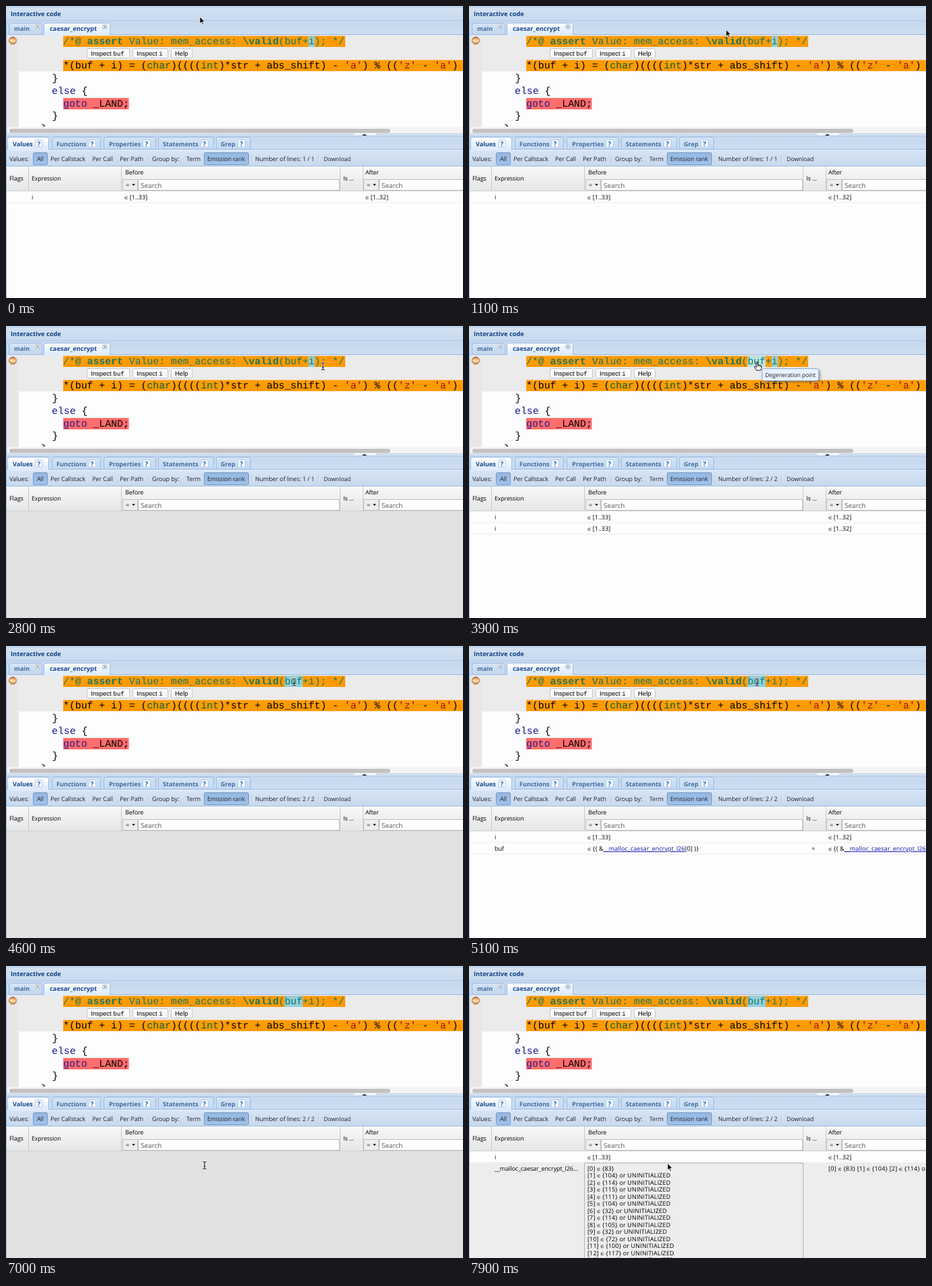
Recreate the animation shown at these times as an HTML page. Size 679 px wide and 435 px high, loop 8 s.

```html
<!DOCTYPE html>
<html lang="en">
<head>
<meta charset="utf-8">
<title>Interactive code</title>
<style>
html, body { margin: 0; width: 100%; height: 100%; overflow: hidden; background: #fdfdfd; }
svg { display: block; }
text { white-space: pre; font-family: "Open Sans", "Noto Sans", sans-serif; text-rendering: geometricPrecision; }
.code { font-family: "Liberation Mono", "Courier New", monospace; font-size: 14.82px; }
.btn { font-family: "Liberation Sans", Arial, sans-serif; font-size: 9.5px; }
.mono { font-family: "Liberation Mono", monospace; font-size: 9.2px; }
.in { font-family: "DejaVu Sans", sans-serif; font-size: 6px; }
.link { fill: #1010b0; text-decoration: underline; }
</style>
</head>
<body>
<svg id="stage" width="679" height="435" viewBox="0 0 679 435"></svg>
<script>
const LOOP = 8000;
const CW = 8.894; // code character width
const HEAP = '__malloc_caesar_encrypt_l26';

const esc = s => s.replace(/&/g, '&amp;').replace(/</g, '&lt;');
const rect = (x, y, w, h, fill, more = '') =>
  `<rect x="${x}" y="${y}" width="${w}" height="${h}" fill="${fill}" ${more}/>`;
const box = (x, y, w, h, fill, stroke, r = 0) =>
  rect(x + .5, y + .5, w - 1, h - 1, fill, `stroke="${stroke}" rx="${r}"`);
const grad = (id, ...stops) => `<linearGradient id="${id}" x2="0" y2="1">` +
  stops.map((c, i) => `<stop offset="${i / (stops.length - 1)}" stop-color="${c}"/>`).join('') +
  '</linearGradient>';
const raw = (x, y, html, { size = 9, fill = '#000', ls = -.1, more = '' } = {}) =>
  `<text x="${x}" y="${y}" font-size="${size}" fill="${fill}" letter-spacing="${ls}" ${more}>${html}</text>`;
const text = (x, y, s, opt) => raw(x, y, esc(s), opt);
const bold = (x, y, s, fill, size = 9.1) =>
  text(x, y, s, { size, fill, ls: 0, more: 'font-weight="700"' });
const inSet = s => `<tspan class="in">∈</tspan> ${s}`;
const group = (id, body) => `<g id="${id}">${body}</g>`;

// Each run is [text, colour, bold?]
const code = (x, y, ...runs) => `<text class="code" x="${x}" y="${y}">` + runs.map(([s, c = '#000', b]) =>
  `<tspan fill="${c}"${b ? ' font-weight="700"' : ''}>${esc(s)}</tspan>`).join('') + '</text>';

function defs() {
  return '<defs>' +
    grad('head', '#d2e1f3', '#c8daef', '#bfd3eb') +
    grad('strip', '#c6d8ee', '#cfdff2') +
    grad('tab', '#d6e4f5', '#c3d7ef') +
    grad('tabOn', '#ffffff', '#deebfb') +
    grad('tools', '#d6e3f3', '#c7d9ee') +
    grad('pressed', '#94b7e3', '#a2c2e9') +
    grad('cols', '#f9f9f9', '#e5e6e8') +
    grad('ball', '#d9702a', '#ffe6b4', '#e88a2a') +
    '<clipPath id="view"><rect x="1" y="44" width="678" height="136.5"/></clipPath>' +
    '<filter id="shade" x="-10%" y="-20%" width="125%" height="160%">' +
    '<feDropShadow dx="2" dy="2" stdDeviation="1.5" flood-color="#555" flood-opacity=".55"/></filter></defs>';
}

function tab(x, w, y, h, on) {
  return `<path d="M${x + .5} ${y + h}v${4 - h}q0 -3.5 3.5 -3.5h${w - 8}q3.5 0 3.5 3.5v${h - 4}"
    fill="url(#${on ? 'tabOn' : 'tab'})" stroke="#99bae4"/>`;
}

function closeIcon(x, y) {
  return `<rect x="${x - 3.5}" y="${y - 3.5}" width="7" height="7" rx="2" fill="#e6eaf0" stroke="#a9b8cb" stroke-width=".8"/>
    <path d="M${x - 1.6} ${y - 1.6}l3.2 3.2m0 -3.2l-3.2 3.2" stroke="#71839a"/>`;
}

function codePanel() {
  const doc = '#1a755f', type = '#08603a', str = '#96150c', key = '#16168c';
  const button = (x, w, label, arg = '') => box(x, 63, w, 15, '#fafafa', '#c6c6c6', 1) +
    `<text class="btn" x="${x + 6}" y="74" fill="#000">${label}<tspan class="mono">${arg}</tspan></text>`;
  const mark = (id, from, len, fill) => rect(85 + from * CW, 44.5, len * CW, 16.5, fill, `id="${id}"`);
  return rect(0, 0, 679, 44, 'url(#head)') + rect(0, 1, 679, 1, '#a9c4e6') +
    rect(0, 22, 679, 22, 'url(#strip)') + rect(0, 21, 679, 1, '#b3cae6') +
    bold(7, 15, 'Interactive code', '#0f3f80', 9.25) +
    tab(4, 50, 25, 17, false) + tab(56, 99, 25, 17, true) +
    rect(0, 42, 679, 1, '#99bae4') + rect(57, 42, 97, 1, '#deebfb') + rect(0, 43, 679, 1, '#deebfb') +
    bold(12, 37, 'main', '#416da3') + bold(65, 37, 'caesar_encrypt', '#15498b', 9.3) +
    closeIcon(47, 31) + closeIcon(147, 31) +
    rect(0, 44, 679, 146, '#fdfdfd') + rect(1, 44, 18, 137, '#e8e6e6') + rect(19, 44, 660, 53.5, '#ebebeb') +
    '<g clip-path="url(#view)">' +
    rect(85, 44.5, 419, 16.5, '#ff9b00') + rect(85, 80.5, 594, 16.5, '#ff9b00') + rect(85, 137, 97.5, 17, '#ff6d6d') +
    mark('selBuf', 37, 3, '#8fd0de') + mark('hotBuf', 37, 3, '#b8e4e6') + mark('selI', 41, 1, '#8fd0de') +
    code(85, 57, ['/*@ ', doc], ['assert', doc, 1], [' Value: mem_access: ', doc], ['\\valid', doc, 1], ['(buf+i); */', doc]) +
    code(85, 93, ['*(buf + i) = ('], ['char', type], [')(((('], ['int', type], [')*str + abs_shift) - '],
      ["'a'", str], [') % (('], ["'z'", str], [' - '], ["'a'", str], [') ']) +
    code(68.5, 112, ['}']) + code(68, 131, ['else', key], [' {']) +
    code(85, 150, ['goto', '#2a1690'], [' _LAND;']) + code(68.5, 168, ['}']) + code(52, 187, ['}']) + '</g>' +
    button(120, 64, 'Inspect ', 'buf') + button(188, 53, 'Inspect ', 'i') + button(245, 32, 'Help') +
    '<circle cx="10" cy="51.5" r="5.3" fill="url(#ball)" stroke="#9a5436"/>' +
    rect(1, 180, 678, 10, '#f3f3f3') + rect(5, 183, 566, 6, '#c1c1c1', 'rx="3"') +
    rect(0, 22, 1, 168, '#99bce8') + rect(1, 44, 1, 146, '#d5e2f2');
}

function tabsAndTools() {
  const tabs = [['Values', 2, 62, 10, 43], ['Functions', 68, 73, 75, 122], ['Properties', 145, 78, 153, 203],
    ['Statements', 226, 83, 233, 289], ['Grep', 312, 52, 319, 344]];
  const labels = [['Values:', 5], ['All', 46], ['Per Callstack', 66], ['Per Call', 128], ['Per Path', 169],
    ['Group by:', 217], ['Term', 268], ['Emission rank', 299, 8.8], ['Download', 472, 8.7]];
  return rect(0, 190, 679, 1, '#a9c4e6') + rect(0, 191, 679, 3, '#dfe9f6') +
    rect(517, 190, 33, 3, '#f0f5fb') + '<path d="M529 193h7l-3.5 -2.4z" fill="#222"/>' +
    rect(0, 193, 679, 22, 'url(#strip)') + rect(0, 193, 679, 1, '#a9c4e6') +
    tabs.map(([s, x, w, tx, qx], i) => tab(x, w, 195, 18, !i) +
      bold(tx, 208.5, s, i ? '#416da3' : '#15498b') +
      box(qx, 199, 12, 12, '#f2f7fd', '#b4cdea', 2) +
      bold(qx + 3.6, 208.7, '?', '#2f6cb5', 10)).join('') +
    rect(0, 213, 679, 1, '#99bae4') + rect(3, 213, 60, 1, '#deebfb') + rect(0, 214, 679, 2, '#deebfb') +
    rect(0, 216, 679, 23, 'url(#tools)') + rect(0, 238, 679, 1, '#99bce8') +
    box(40, 218, 22, 19, 'url(#pressed)', '#7698c6', 2) + box(294, 218, 67, 19, 'url(#pressed)', '#7698c6', 2) +
    [211, 365, 464].map(x => rect(x, 222, 1, 12, '#b4c6de') + rect(x + 1, 222, 1, 12, '#e4edf8')).join('') +
    labels.map(([s, x, size = 9]) => text(x, 231, s, { size, fill: '#222' })).join('') +
    text(370, 231, '', { fill: '#222', more: 'id="count"' });
}

function tableHead() {
  const filter = (x, w) => box(x, 258, 23, 17, '#eeeeee', '#c4c4c4') +
    text(x + 5, 270, '=', { fill: '#222' }) + `<path d="M${x + 14} 265h5l-2.5 3z" fill="#222"/>` +
    box(x + 23, 258, w, 17, '#ffffff', '#b9bcc8') + text(x + 27, 270.5, 'Search', { size: 10, fill: '#555', ls: 0 });
  return rect(0, 239, 679, 36, 'url(#cols)') +
    [33, 171, 496, 530].map(x => rect(x, 239, 1, 36, '#c8c8c8')).join('') +
    text(5, 260, 'Flags') + text(38, 260, 'Expression', { size: 8.8 }) + text(177, 251, 'Before') +
    text(501, 260, 'Is ...') + text(534, 251, 'After') +
    filter(173, 300) + filter(531, 140) + rect(0, 275, 679, 1, '#d0d0d0');
}

function row(y, name, before, after, same = '') {
  const o = { ls: .06 };
  return rect(1, y + 17, 678, 1, '#ededed') + text(38, y + 12.5, name) +
    raw(176, y + 12.5, inSet(before), o) + raw(534, y + 12.5, inSet(after), o) + text(509, y + 12.5, same);
}

function heapRow() {
  const cells = [83, 104, 114, 115, 111, 104, 32, 114, 105, 32, 72, 100, 117, 116];
  const cell = (v, i) => `[${i}] ${inSet(`{${v}}`)}`;
  return rect(1, 293, 678, 142, '#ededed') +
    `<path d="M171.5 440V293.5H496.5V440" fill="none" stroke="#777" stroke-dasharray="1 1"/>` +
    text(38, 304.5, HEAP + '...') +
    cells.map((v, i) => raw(176, 304.5 + 10.5 * i, cell(v, i) + (i ? ' or UNINITIALIZED' : ''), { ls: .15 })).join('') +
    raw(534, 304.5, cells.slice(0, 3).map(cell).join(' ') + ' or UNINITIALIZED', { ls: .2 });
}

function tableBody() {
  const ptr = `{{ &amp;<tspan class="link">${HEAP}</tspan>[0] }}`;
  return rect(0, 276, 679, 159, '#fdfdfd') + row(275.5, 'i', '[1..33]', '[1..32]') +
    group('rowI', row(292.5, 'i', '[1..33]', '[1..32]')) +
    group('rowBuf', row(292.5, 'buf', ptr, ptr, '=')) +
    group('rowHeap', heapRow()) +
    rect(0, 276, 679, 159, '#e2e2e2', 'id="mask"') + rect(0, 190, 1, 245, '#99bce8');
}

function overlays() {
  const menu = `<g filter="url(#shade)">${box(454, 51, 146, 43, '#f1f1f1', '#a0a4ac')}</g>` +
    text(460, 67, 'Track this term', { size: 8.9 }) +
    text(528, 67, 'Ctrl+<left click>', { fill: '#888', ls: 0 }) + text(460, 87, 'Copy');
  const tip = `<g filter="url(#shade)">${box(435, 63, 85, 19, '#e8f1fd', '#8eaace', 3)}</g>` +
    text(440, 76, 'Degeneration point', { size: 8.5, fill: '#222' });
  const beam = 'M-2.5 -5.5Q0 -5.5 0 -4V4Q0 5.5 -2.5 5.5M2.5 -5.5Q0 -5.5 0 -4M0 4Q0 5.5 2.5 5.5M-1.2 1.5H1.2';
  return group('menu', menu) + group('tip', tip) + group('cursor',
    group('arrow', '<path d="M0 0V10.2L2.4 8L4.2 12L5.8 11.3L4 7.4H7.2Z" fill="#000" stroke="#fff" stroke-width=".8"/>') +
    group('beam', `<path d="${beam}" fill="none" stroke="#fff" stroke-width="2.4"/><path d="${beam}" fill="none" stroke="#000"/>`) +
    group('hand', `<path d="M-1 0Q0 -1.2 1 0V4L3 4.3L5 4.8L6.6 5.6V8.5L5.4 12H-.6L-3.8 7.6Q-4 6 -2.6 6.4L-1 7.6Z"
      fill="#fff" stroke="#000" stroke-width=".9"/><path d="M1 4V6.5M3 4.4V6.7M5 4.9V7" stroke="#000" stroke-width=".7"/>`));
}

const stage = document.getElementById('stage');
stage.innerHTML = defs() + codePanel() + tabsAndTools() + tableHead() + tableBody() + overlays();
const el = Object.fromEntries([...stage.querySelectorAll('[id]')].map(e => [e.id, e]));

// Pointer stops: time, x, y
const path = [[0, 288, 16], [500, 288, 16], [1600, 453, 50], [2100, 453, 50], [2600, 471, 60], [3200, 471, 60],
  [3700, 428, 54], [5400, 428, 54], [6300, 295, 297], [7200, 295, 297], [7500, 295, 294], [LOOP, 295, 294]];
// Pointer shape from each time on
const shapes = [[0, 'arrow'], [1250, 'beam'], [1500, 'hand'], [1800, 'arrow'], [2700, 'beam'], [3500, 'hand'],
  [4600, 'beam'], [5800, 'arrow'], [6200, 'hand'], [6700, 'beam'], [7400, 'arrow']];
const spans = {
  selI: [[0, 4600]], hotBuf: [[3600, 4600]], selBuf: [[4600, LOOP]],
  menu: [[1800, 2700]], tip: [[3800, 4400]],
  mask: [[2800, 3200], [4600, 4900], [6700, 7400]],
  rowI: [[3200, 4600]], rowBuf: [[4900, 6700]], rowHeap: [[7400, LOOP]]
};

function pointAt(t) {
  const i = path.findIndex(p => p[0] > t);
  const [t0, x0, y0] = path[i - 1], [t1, x1, y1] = path[i];
  const u = (t - t0) / (t1 - t0), k = u * u * (3 - 2 * u);
  return [x0 + (x1 - x0) * k, y0 + (y1 - y0) * k];
}

const show = (id, on) => el[id].setAttribute('visibility', on ? 'visible' : 'hidden');

function draw(t) {
  for (const id in spans) show(id, spans[id].some(([a, b]) => t >= a && t < b));
  const shape = shapes.filter(s => s[0] <= t).pop()[1];
  for (const id of ['arrow', 'beam', 'hand']) show(id, id === shape);
  el.cursor.setAttribute('transform', `translate(${pointAt(t)})`);
  const n = t < 3200 ? 1 : 2;
  el.count.textContent = `Number of lines: ${n} / ${n}`;
}

const start = performance.now();
function tick() {
  draw((performance.now() - start) % LOOP);
  requestAnimationFrame(tick);
}
tick();
</script>
</body>
</html>
```
